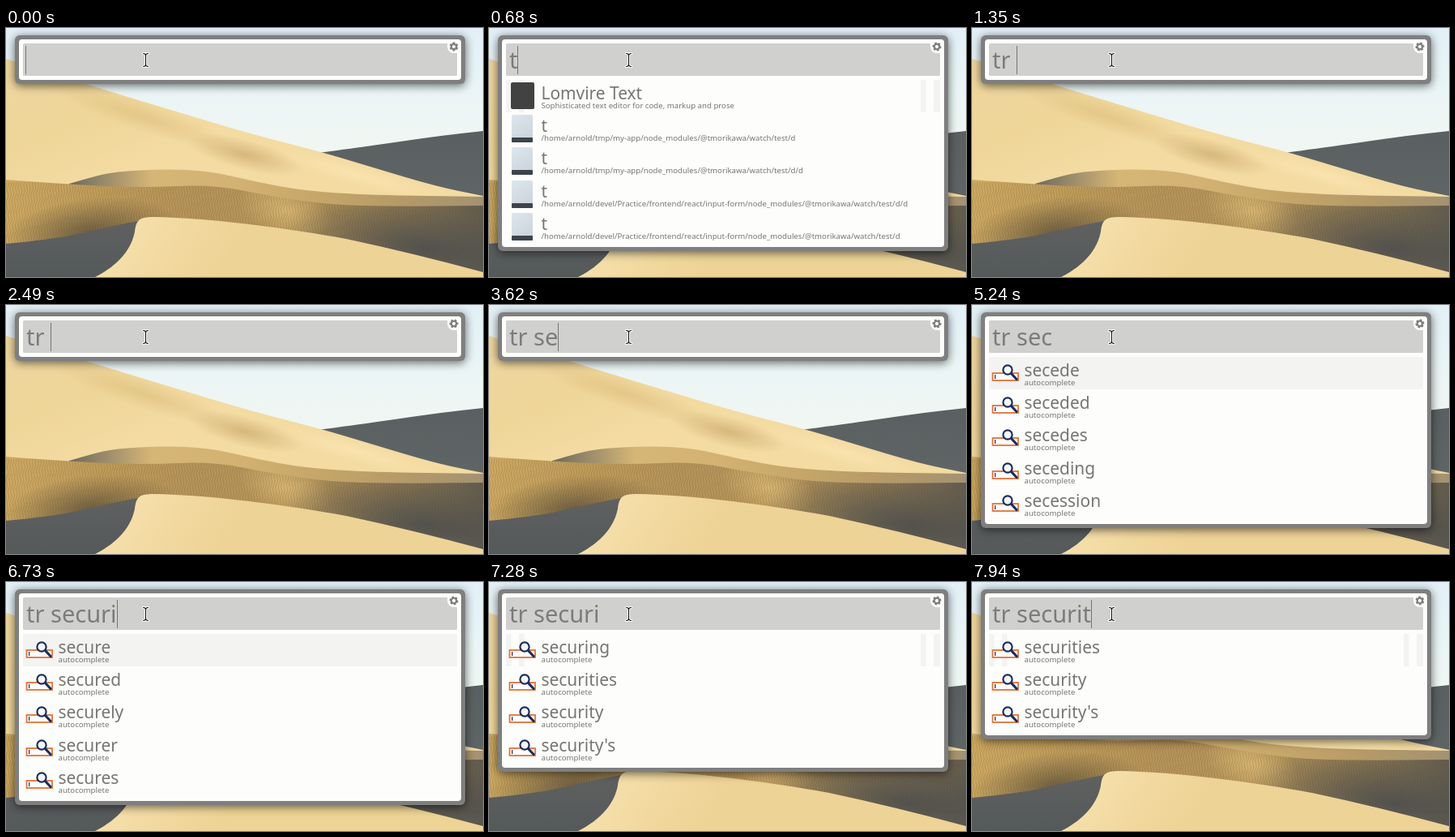
An HTML page with a canvas that plays this animation: 589 px wide and 307 px high, repeating every 8 s.

```html
<!DOCTYPE html>
<html lang="en">
<head>
<meta charset="utf-8">
<title>Launcher</title>
<style>
html, body { margin: 0; width: 100%; height: 100%; overflow: hidden; }
canvas { display: block; width: 589px; height: 307px; }
</style>
</head>
<body>
<canvas id="stage" width="589" height="307"></canvas>
<script>
const W = 589, H = 307, LOOP = 8000, ROW = 40.2;
const FONT = '"Noto Sans", "Open Sans", sans-serif';
const canvas = document.getElementById('stage');
const ctx = canvas.getContext('2d');

const home = '/home/arnold/';
const watch = 'node_modules/@tmorikawa/watch/test/d';
const form = home + 'devel/Practice/frontend/react/input-form/' + watch;
const app = home + 'tmp/my-app/' + watch;
const words = s => s.split(' ').map(title => ({ title, sub: 'autocomplete', icon: lens }));
const file = sub => ({ title: 't', sub, icon: disk });

const files = [
  { title: 'Lomvire Text', sub: 'Sophisticated text editor for code, markup and prose', icon: square },
  file(app), file(app + '/d'), file(form + '/d'), file(form)
];

// [start in ms, value]
const typed = [
  [0, ''], [410, 't'], [940, 'tr'], [1220, 'tr '], [3220, 'tr s'], [3480, 'tr se'],
  [3720, 'tr sec'], [5370, 'tr secu'], [6100, 'tr secur'], [6720, 'tr securi'], [7810, 'tr securit']
];
const lists = [
  [0, []], [540, files], [1340, []],
  [3880, words('secede seceded secedes seceding secession')],
  [5490, words('secular secularism secularist secularists secularize')],
  [6230, words('secure secured securely securer secures')],
  [6860, words('securing securities security security\'s')],
  [7930, words('securities security security\'s')]
];
const current = (track, t) => track.filter(k => k[0] <= t).pop();

function gradient(c, x0, y0, x1, y1, colors) {
  const g = c.createLinearGradient(x0, y0, x1, y1);
  colors.forEach((col, i) => g.addColorStop(i / (colors.length - 1), col));
  return g;
}

// Smooth ridge through points, closed along the bottom edge.
function ridge(c, pts, fill) {
  c.beginPath();
  c.moveTo(pts[0][0], H);
  c.lineTo(...pts[0]);
  for (let i = 1; i < pts.length - 1; i++) {
    const [x, y] = pts[i], [nx, ny] = pts[i + 1];
    c.quadraticCurveTo(x, y, (x + nx) / 2, (y + ny) / 2);
  }
  c.lineTo(...pts[pts.length - 1]);
  c.lineTo(pts[pts.length - 1][0], H);
  c.closePath();
  c.fillStyle = fill;
  c.fill();
}

function glow(c, x, y, rx, ry, angle, rgb, a) {
  c.save();
  c.translate(x, y);
  c.rotate(angle);
  c.scale(rx, ry);
  const g = c.createRadialGradient(0, 0, 0, 0, 0, 1);
  g.addColorStop(0, `rgba(${rgb},${a})`);
  g.addColorStop(1, `rgba(${rgb},0)`);
  c.fillStyle = g;
  c.fillRect(-1, -1, 2, 2);
  c.restore();
}

function paintDunes() {
  const layer = document.createElement('canvas');
  layer.width = W;
  layer.height = H;
  const c = layer.getContext('2d');
  c.fillStyle = gradient(c, 0, 0, 0, 170, ['#e2f0f7', '#ebf5f5', '#f2f7f1']);
  c.fillRect(0, 0, W, H);

  ridge(c, [[386, 154], [430, 148], [480, 141], [535, 133], [W, 127]],
    gradient(c, 0, 130, 0, 205, ['#5a6061', '#5f6565']));
  ridge(c, [[0, 38], [40, 50], [95, 68], [200, 100], [300, 130], [390, 153], [450, 171], [530, 195], [W, 207]],
    gradient(c, 0, 60, 60, 210, ['#efd69f', '#eed598', '#f3dba2']));
  glow(c, 295, 156, 75, 19, 0.25, '196,160,98', 0.6);
  glow(c, 170, 110, 120, 18, 0.32, '214,180,114', 0.45);
  glow(c, 430, 180, 110, 14, 0.27, '252,230,178', 0.7);

  // Far hump with its shaded left flank.
  ridge(c, [[78, 192], [105, 184], [135, 177], [195, 174], [250, 176], [310, 190], [370, 201], [450, 206], [W, 208]],
    gradient(c, 78, 0, W, 0, ['#6c6a60', '#d6b676', '#d3b273', '#c6a769', '#b59a68', '#a39272']));
  ridge(c, [[0, 187], [80, 193], [170, 197], [255, 193], [330, 208], [400, 218], [480, 220], [W, 219]],
    gradient(c, 0, 0, W, 0, ['#cda962', '#bf9c5a', '#b6945a', '#b8975b', '#8c7852', '#625d50']));
  c.save();
  c.clip();
  glow(c, 105, 252, 110, 42, -0.1, '84,74,56', 0.75);
  glow(c, 345, 225, 60, 32, 0.3, '224,190,122', 0.75);
  glow(c, 520, 272, 180, 52, 0.15, '78,80,80', 0.9);
  c.lineWidth = 0.8;
  c.strokeStyle = 'rgba(84,66,38,.25)';
  for (let x = 0; x < W + 10; x += 3.3) {
    c.beginPath();
    c.moveTo(x, 190);
    for (let y = 194; y < 290; y += 4) c.lineTo(x + 1.2 * Math.sin(y * 0.4 + x * 0.12) - (y - 190) * 0.08, y);
    c.stroke();
  }
  c.restore();

  ridge(c, [[0, 266], [55, 261], [110, 249], [150, 240], [190, 234]],
    gradient(c, 0, 240, 0, H, ['#5f6060', '#54595a']));
  c.beginPath();
  c.moveTo(110, H);
  c.bezierCurveTo(140, 292, 155, 272, 159, 251);
  c.bezierCurveTo(161, 236, 165, 233, 182, 233);
  c.bezierCurveTo(250, 234, 350, 247, 420, 260);
  c.quadraticCurveTo(500, 277, W, 301);
  c.lineTo(W, H);
  c.closePath();
  c.fillStyle = gradient(c, 160, 240, 260, H, ['#f5dfaa', '#f1d89e', '#eed396']);
  c.fill();
  return layer;
}

function box(x, y, w, h, r, fill) {
  ctx.beginPath();
  ctx.roundRect(x, y, w, h, r);
  ctx.fillStyle = fill;
  ctx.fill();
}

function label(s, x, y, size, color = '#767675') {
  ctx.font = `${size}px ${FONT}`;
  ctx.fillStyle = color;
  ctx.fillText(s, x, y);
  return ctx.measureText(s).width;
}

function square() {
  box(27, 3, 29, 33, 2, '#424242');
}

function disk() {
  box(28, 3, 26, 34, 1.5, gradient(ctx, 28, 3, 50, 36, ['#dfe6ec', '#c9d3dc']));
  box(28, 31, 26, 6, 1, '#3e444a');
}

function lens() {
  ctx.fillStyle = '#fff';
  ctx.fillRect(25, 20, 32, 9);
  ctx.lineWidth = 1.8;
  ctx.strokeStyle = '#e2733a';
  ctx.strokeRect(25.5, 20, 31.5, 9);
  ctx.fillStyle = '#1d2d5b';
  ctx.fillRect(28, 22, 1.2, 5);
  ctx.strokeStyle = '#1d2d5b';
  ctx.lineCap = 'round';
  ctx.lineWidth = 3.2;
  ctx.beginPath();
  ctx.moveTo(48.5, 20.5);
  ctx.lineTo(55, 27.5);
  ctx.stroke();
  ctx.lineWidth = 2.2;
  ctx.beginPath();
  ctx.arc(44, 16, 5.6, 0, 7);
  ctx.fillStyle = '#f4f8fb';
  ctx.fill();
  ctx.stroke();
}

function gear(t) {
  box(545, 14, 17, 17, [0, 5, 0, 8], '#fdfdfb');
  ctx.save();
  ctx.translate(553, 23);
  ctx.rotate(t / 1000 * Math.PI / 3);
  ctx.fillStyle = ctx.strokeStyle = '#7f7f7d';
  for (let i = 0; i < 6; i++) {
    ctx.fillRect(-1.4, -5.4, 2.8, 3);
    ctx.rotate(Math.PI / 3);
  }
  ctx.lineWidth = 2.2;
  ctx.beginPath();
  ctx.arc(0, 0, 3.2, 0, 7);
  ctx.stroke();
  ctx.restore();
}

function pointer() {
  ctx.beginPath();
  for (const s of [-1, 1]) {
    const end = 39.5 + s * 8;
    ctx.moveTo(169.5, end);
    ctx.quadraticCurveTo(172.5, end, 172.5, end - s * 2.5);
    ctx.quadraticCurveTo(172.5, end, 175.5, end);
  }
  ctx.moveTo(172.5, 33);
  ctx.lineTo(172.5, 46);
  ctx.lineCap = 'round';
  for (const [w, col] of [[3, '#fff'], [1.1, '#111']]) {
    ctx.lineWidth = w;
    ctx.strokeStyle = col;
    ctx.stroke();
  }
}

function highlight(rows) {
  ctx.fillStyle = '#f3f3f1';
  if (rows[0].title.startsWith('sec') && rows.length === 5) ctx.fillRect(21, 64, 536, 40);
  else for (const x of [21, 37, 533, 549]) ctx.fillRect(x, 64, x === 549 ? 8 : 6.5, 40);
}

function draw(t) {
  const [since, query] = current(typed, t);
  const rows = current(lists, t)[1];
  const extra = rows.length ? Math.round(rows.length * ROW + 4.5) : 0;

  ctx.drawImage(dunes, 0, 0);
  ctx.save();
  ctx.shadowColor = 'rgba(0,0,0,.6)';
  ctx.shadowBlur = 12;
  ctx.shadowOffsetY = 2;
  box(11, 9, 556, 60 + extra, 6, '#7f7f7f');
  ctx.restore();
  box(16, 14, 546, 50 + extra, 4, '#fdfdfb');
  box(21, 19, 536, 40, 1.5, '#d0d0ce');
  gear(t);

  const end = 25 + label(query, 25, 50, 29, '#7c7c7a');
  if ((t - since) % 1000 < 500) {
    ctx.fillStyle = '#757575';
    ctx.fillRect(Math.round(end) - (query ? 0 : 1), 22, 1, 35);
  }

  if (rows.length) highlight(rows);
  rows.forEach((row, i) => {
    ctx.save();
    ctx.translate(0, Math.round(64 + i * ROW));
    row.icon();
    label(row.title, 64.5, 24, 20.9);
    label(row.sub, 64.5, 35, 9.65);
    ctx.restore();
  });
  pointer();
}

const dunes = paintDunes();
const start = performance.now();
function tick() {
  draw((performance.now() - start) % LOOP);
  requestAnimationFrame(tick);
}
tick();
</script>
</body>
</html>
```
